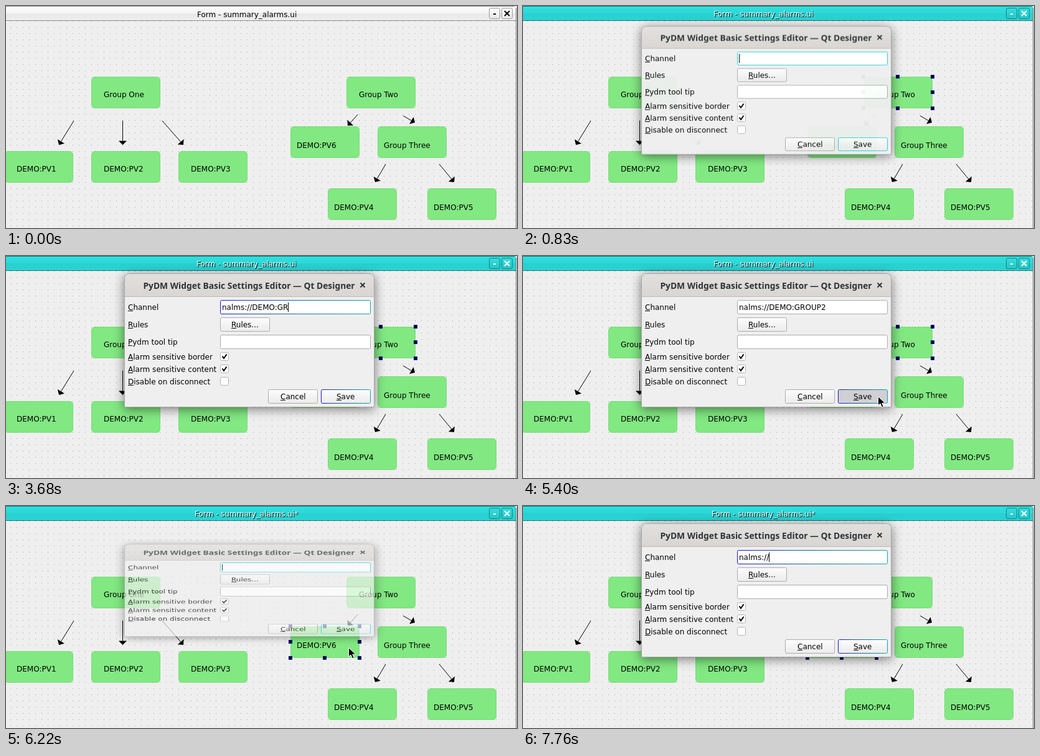
An HTML page with a canvas that plays this animation: 821 by 358 pixels, repeating every 8000 ms.

```html
<!DOCTYPE html>
<html lang="en">
<head>
<meta charset="utf-8">
<title>Alarm summary form</title>
<style>
  html, body { margin: 0; width: 100%; height: 100%; overflow: hidden; background: #efefef; }
  canvas { display: block; }
</style>
</head>
<body>
<canvas id="stage" width="821" height="358"></canvas>
<script>
const LOOP = 8000;
const W = 821, H = 358;
const UI_FONT = '12px "DejaVu Sans", sans-serif';
const TITLE_FONT = '700 13.8px "Noto Sans", "Open Sans", sans-serif';
const MID_Y = 136;

const stage = document.getElementById('stage').getContext('2d');
const layer = document.createElement('canvas');
layer.width = W;
layer.height = H;
const dlg = layer.getContext('2d');

// label, left, top, text baseline offset
const boxes = [
  ['Group One', 137, 114, 33], ['DEMO:PV1', -3, 234, 33],
  ['DEMO:PV2', 137, 234, 33], ['DEMO:PV3', 277, 234, 33],
  ['Group Two', 547, 114, 33], ['DEMO:PV6', 457, 194, 35],
  ['Group Three', 597, 194, 35], ['DEMO:PV4', 517, 294, 35],
  ['DEMO:PV5', 677, 294, 35]
];
const arrows = [
  [109, 185, 85, 224], [187.5, 185, 187.5, 224], [251, 185, 285, 224],
  [565, 175, 549, 193], [638, 177, 657, 188], [610, 255, 593, 284], [696, 255, 720, 284]
];

// time of each keystroke and the number of characters shown from then on
const FIRST = 'nalms://DEMO:GROUP2';
const firstKeys = [1500, 1580, 1660, 1740, 1850, 2010, 2270, 2400, 2830, 2930, 3040, 3140,
  3330, 3500, 3680, 3750, 3870, 3980, 4230].map((t, i) => [t, i + 1]);
const secondKeys = [[6930, 1], [7020, 2], [7100, 4], [7190, 5], [7400, 6], [7620, 7], [7760, 8]];

const cursorPath = [
  [5080, 598, 238], [5300, 570, 226], [5580, 570, 226], [5760, 550, 228],
  [6250, 550, 228], [6320, 701, 244], [6370, 701, 244]
];

const typed = (keys, t) => keys.reduce((n, [at, count]) => t >= at ? count : n, 0);
const within = (t, a, b) => t >= a && t < b;
const easeOut = p => 1 - (1 - Math.min(1, p)) ** 2;

function roundRect(c, x, y, w, h, r) {
  c.beginPath();
  c.roundRect(x, y, w, h, r);
}

function vertical(c, y0, y1, ...stops) {
  const g = c.createLinearGradient(0, y0, 0, y1);
  stops.forEach(([at, color]) => g.addColorStop(at, color));
  return g;
}

function line(c, points, color, width) {
  c.beginPath();
  points.forEach(([x, y]) => c.lineTo(x, y));
  c.strokeStyle = color;
  c.lineWidth = width;
  c.stroke();
}

function write(c, s, x, y, color = '#000') {
  c.font = UI_FONT;
  c.fillStyle = color;
  c.fillText(s, x, y);
}

function mnemonic(s, x, y) {
  write(dlg, s, x, y);
  dlg.fillRect(x, y + 1, Math.round(dlg.measureText(s[0]).width), 1);
}

function drawTitleBar(active, name) {
  const c = stage;
  c.fillStyle = active
    ? vertical(c, 0, 23, [0, '#30e0e0'], [.5, '#2cd8d8'], [.51, '#29cfcf'], [1, '#2ad4d4'])
    : vertical(c, 0, 23, [0, '#ffffff'], [.5, '#f4f4f4'], [.51, '#e8e8e8'], [1, '#efefef']);
  c.fillRect(0, 0, 819, 24);
  c.fillStyle = active ? '#177676' : '#8e8e8e';
  c.fillRect(0, 0, 817, 1);
  c.fillRect(0, 23, 819, 1);

  c.font = UI_FONT;
  const x = Math.round(387.5 - c.measureText(name).width / 2);
  write(c, name, x, 18);
  if (active) write(c, name, x - 1, 17, '#fff');

  const ink = active ? '#fff' : '#000';
  for (const left of [776.5, 796.5]) {
    roundRect(c, left, 3.5, 17, 17, 2.5);
    c.fillStyle = active
      ? vertical(c, 3, 21, [0, '#35dede'], [1, '#27c4c4'])
      : vertical(c, 3, 21, [0, '#ffffff'], [1, '#e6e6e6']);
    c.fill();
    c.strokeStyle = active ? '#178686' : '#9a9a9a';
    c.lineWidth = 1;
    c.stroke();
  }
  c.fillStyle = ink;
  c.fillRect(783, 12, 4, 2);
  line(c, [[801, 8], [809, 16]], ink, 2.2);
  line(c, [[809, 8], [801, 16]], ink, 2.2);
}

function drawArrow([x0, y0, x1, y1]) {
  const c = stage, len = Math.hypot(x1 - x0, y1 - y0);
  const dx = (x1 - x0) / len * 6.5, dy = (y1 - y0) / len * 6.5;
  const bx = x1 - dx, by = y1 - dy;
  line(c, [[x0, y0], [bx, by]], '#000', 1);
  c.beginPath();
  c.moveTo(x1, y1);
  c.lineTo(bx - dy, by + dx);
  c.lineTo(bx + dy, by - dx);
  c.fillStyle = '#000';
  c.fill();
}

function drawForm() {
  const c = stage;
  c.fillStyle = '#efefef';
  c.fillRect(0, 0, W, H);
  c.fillStyle = '#9f9f9f';
  for (let y = 24; y < H; y += 10)
    for (let x = 7; x < 818; x += 10) c.fillRect(x, y, 1, 1);
  for (const [label, x, y, base] of boxes) {
    roundRect(c, x, y, 111, 51, 6);
    c.fillStyle = '#82e882';
    c.fill();
    roundRect(c, x + .5, y + .5, 110, 50, 5.5);
    c.setLineDash([2, 2]);
    c.strokeStyle = '#68d268';
    c.lineWidth = 1;
    c.stroke();
    c.setLineDash([]);
    write(c, label, x + 20 - (base === 35 ? 10 : 0), y + base);
  }
  arrows.forEach(drawArrow);
  c.fillStyle = '#808080';
  c.fillRect(819, 3, 1, H);
  c.fillStyle = '#d8d8d8';
  c.fillRect(820, 0, 1, H);
}

function drawHandles(x, y) {
  for (const dx of [0, 55, 111])
    for (const dy of [0, 25, 51]) {
      if (dx === 55 && dy === 25) continue;
      stage.fillStyle = '#0000b4';
      stage.fillRect(x + dx - 3, y + dy - 3, 6, 6);
      stage.fillStyle = '#000';
      stage.fillRect(x + dx - 2, y + dy - 2, 4, 4);
    }
}

function focusColor(x, w, fading) {
  if (fading) return '#22cfdc';
  const g = dlg.createLinearGradient(x, 0, x + w, 0);
  g.addColorStop(0, '#1616d8');
  g.addColorStop(.25, '#1a4a9c');
  g.addColorStop(1, '#18a4a4');
  return g;
}

function frame(x, y, w, h, fill, stroke) {
  roundRect(dlg, x + .5, y + .5, w - 1, h - 1, 2);
  dlg.fillStyle = fill;
  dlg.fill();
  dlg.strokeStyle = stroke;
  dlg.lineWidth = 1;
  dlg.stroke();
}

function button(label, x, y, stroke, pressed) {
  const fill = pressed ? '#d0d0d4' : vertical(dlg, y, y + 23, [0, '#fdfdfd'], [1, '#ebebeb']);
  frame(x, y, 80, 23, fill, stroke);
  const w = dlg.measureText(label).width;
  mnemonic(label, Math.round(x + 40 - w / 2), y + 16);
}

function drawDialog({ text, caret, pressed, fading }) {
  const c = dlg, grey = '#acacac';
  c.clearRect(0, 0, W, H);
  c.font = UI_FONT;

  c.save();
  c.shadowColor = 'rgba(0,0,0,.5)';
  c.shadowBlur = 17;
  c.shadowOffsetY = 3;
  roundRect(c, 190, 28, 402, 216, [8, 8, 0, 0]);
  c.fillStyle = '#a9a9a9';
  c.fill();
  c.restore();

  roundRect(c, 191, 29, 400, 214, [7, 7, 0, 0]);
  c.fillStyle = '#efefef';
  c.fill();
  roundRect(c, 191, 29, 400, 37, [7, 7, 0, 0]);
  c.fillStyle = vertical(c, 29, 66, [0, '#e2e0de'], [1, '#d8d5d2']);
  c.fill();
  c.fillStyle = '#bfbab5';
  c.fillRect(191, 65, 400, 1);

  c.font = TITLE_FONT;
  c.fillStyle = '#2e3436';
  c.textAlign = 'center';
  c.fillText('PyDM Widget Basic Settings Editor — Qt Designer', 390.5, 53);
  c.textAlign = 'left';
  line(c, [[569.5, 43.5], [576.5, 50.5]], '#2e3436', 2);
  line(c, [[576.5, 43.5], [569.5, 50.5]], '#2e3436', 2);

  mnemonic('Channel', 196, 87);
  mnemonic('Rules', 196, 115);
  mnemonic('Pydm tool tip', 196, 143);
  frame(344, 71, 242, 23, '#fff', pressed ? grey : focusColor(344, 242, fading));
  frame(344, 127, 242, 23, '#fff', grey);
  button('Rules...', 344, 99, grey);

  ['Alarm sensitive border', 'Alarm sensitive content', 'Disable on disconnect'].forEach((s, i) => {
    const y = 156 + i * 20;
    mnemonic(s, 196, y + 11);
    frame(344, y - 1, 14, 14, '#fff', '#b4b4b4');
    if (i < 2) line(c, [[347.5, y + 5.5], [350, y + 9], [354.5, y + 2.5]], '#000', 2);
  });

  button('Cancel', 421, 215, grey);
  button('Save', 506, 215, focusColor(506, 80, fading), pressed);

  write(c, text, 347, 87);
  if (caret) c.fillRect(347 + Math.round(c.measureText(text).width), 75, 1, 15);
}

function dialogState(t) {
  if (within(t, 780, 5640)) {
    const grow = easeOut(.443 + Math.floor((t - 780) / 50) * .357);
    const shrink = t < 5540 ? 1 : 1 - easeOut(.3 + Math.floor((t - 5540) / 50) * .35);
    const pressed = t >= 5350;
    return {
      text: FIRST.slice(0, typed(firstKeys, t)),
      caret: !pressed && !within(t, 1220, 1500) && t < 4840,
      pressed: pressed && t < 5490,
      fading: grow < 1,
      scale: grow * shrink,
      alpha: grow
    };
  }
  if (t >= 6220) {
    const grow = easeOut(.443 + Math.floor((t - 6220) / 50) * .357);
    return {
      text: FIRST.slice(0, typed(secondKeys, t)),
      caret: !within(t, 6620, 6930),
      pressed: false,
      fading: grow < 1,
      scale: grow,
      alpha: grow
    };
  }
  return null;
}

function drawCursor(t) {
  const i = cursorPath.findIndex(([at]) => at > t);
  if (i < 1) return;
  const [t0, x0, y0] = cursorPath[i - 1], [t1, x1, y1] = cursorPath[i];
  const p = (t - t0) / (t1 - t0);
  const c = stage;
  c.save();
  c.translate(Math.round(x0 + (x1 - x0) * p), Math.round(y0 + (y1 - y0) * p));
  c.beginPath();
  [[.5, .5], [.5, 15], [4, 12], [6.6, 18], [9.2, 16.9], [6.8, 11.2], [11.8, 11.2]]
    .forEach(([x, y]) => c.lineTo(x, y));
  c.closePath();
  c.fillStyle = '#000';
  c.fill();
  c.strokeStyle = '#fff';
  c.lineWidth = 1;
  c.stroke();
  c.restore();
}

function render(t) {
  drawForm();
  const saved = t >= 5490;
  drawTitleBar(t >= 520, 'Form - summary_alarms.ui' + (saved ? '*' : ''));
  if (t >= 5930) drawHandles(457, 194);
  else if (t >= 520) drawHandles(547, 114);

  const state = dialogState(t);
  if (state) {
    drawDialog(state);
    stage.save();
    stage.globalAlpha = state.alpha;
    stage.translate(0, MID_Y);
    stage.scale(1, state.scale);
    stage.drawImage(layer, 0, -MID_Y);
    stage.restore();
  }
  drawCursor(t);
}

const start = performance.now();
function tick() {
  render((performance.now() - start) % LOOP);
  requestAnimationFrame(tick);
}
tick();
</script>
</body>
</html>
```
